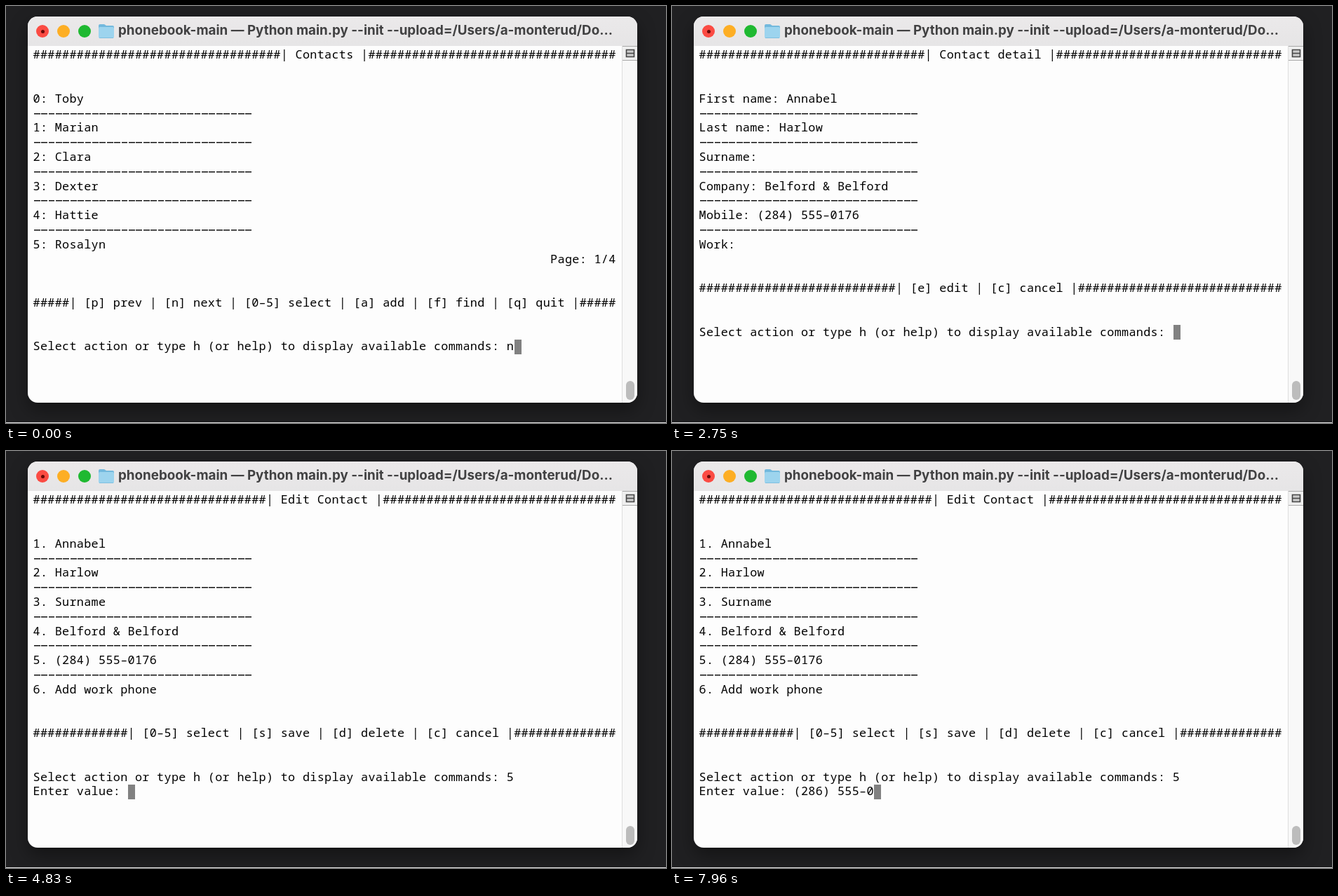
An HTML page for the animation above (8000 ms loop, 941 px wide and 595 px high).

```html
<!DOCTYPE html>
<html lang="en">
<head>
<meta charset="utf-8">
<title>Phonebook terminal</title>
<style>
  html, body { margin: 0; width: 100%; height: 100%; overflow: hidden; background: #202022; }
  #stage { position: relative; width: 941px; height: 595px; overflow: hidden; background: #202022; }
  #stage::after { content: ""; position: absolute; left: 0; right: 0; bottom: 0; height: 1px; background: #e4e4e4; }
  #window {
    position: absolute; left: 31px; top: 15px; width: 869px; height: 551px;
    border-radius: 14px; overflow: hidden; background: #fdfdfd;
  }
  #shade {
    position: absolute; left: 31px; top: 15px; width: 869px; height: 551px;
    border-radius: 14px; box-shadow: 0 10px 26px rgba(0, 0, 0, .4);
  }
  #bar { position: absolute; left: 0; top: 0; width: 100%; height: 42px; background: linear-gradient(#ebe9ea, #e6e5e6); }
  .light { position: absolute; top: 12px; width: 18px; height: 18px; border-radius: 50%; }
  .light.close::after {
    content: ""; position: absolute; left: 6.5px; top: 6.5px; width: 5px; height: 5px;
    border-radius: 50%; background: #6a0a08;
  }
  #folder { position: absolute; left: 100px; top: 9px; }
  #title {
    position: absolute; left: 129px; top: 8px; line-height: 24px; white-space: pre;
    font: 700 18.8px/24px Inter, sans-serif; color: #414142;
  }
  #track { position: absolute; right: 0; top: 42px; width: 21px; bottom: 0; background: #f8f8f8; border-left: 1px solid #dedede; }
  #thumb { position: absolute; left: 5px; bottom: 4px; width: 12px; height: 27px; border-radius: 6px; background: #bcbcbc; }
  #split { position: absolute; left: 0; top: 0; }
  #screen {
    position: absolute; left: 38.5px; top: 59.4px; color: #000; white-space: pre;
    font: 500 16.8px/20.8px "Noto Sans Mono", "DejaVu Sans Mono", monospace; letter-spacing: .32px;
  }
  #screen div { height: 20.8px; }
  #screen .rule {
    width: 312px;
    background: repeating-linear-gradient(90deg, transparent 0 .8px, #111 .8px 9.6px, transparent 9.6px 10.4px) 0 10px / 100% 1.5px no-repeat;
  }
  #cursor { position: absolute; width: 10.4px; height: 20.8px; background: #818181; }
</style>
</head>
<body>
<div id="stage">
  <div id="shade"></div>
  <div id="window">
    <div id="bar">
      <div class="light close" style="left:12px;background:#fb4b43"></div>
      <div class="light" style="left:42px;background:#fdae24"></div>
      <div class="light" style="left:71.5px;background:#1fb931"></div>
      <svg id="folder" width="24" height="24">
        <path d="M1 4q0-2 2-2h6l3 2h9q2 0 2 2v4H1z" fill="#73b9dd"/>
        <rect x="1" y="6" width="22" height="16" rx="2" fill="#9dd4ee"/>
        <path d="M2 21.5h20" stroke="#7ebfe0"/>
      </svg>
      <div id="title">phonebook-main — Python main.py --init --upload=/Users/a-monterud/Do...</div>
    </div>
    <div id="track">
      <svg id="split" width="21" height="22">
        <path d="M0 .5h21M0 20.5h21" stroke="#a9a9a9"/>
        <rect y="1" width="21" height="19" fill="#efefef"/>
        <path d="M5.5 5.5h11v10h-11zM5.5 10.5h11" fill="#c9c9c9" stroke="#444" stroke-width="1.6"/>
      </svg>
      <div id="thumb"></div>
    </div>
  </div>
  <div id="screen"></div>
  <div id="cursor"></div>
</div>
<script>
const LOOP = 8000, COLS = 80, CELL = 10.4, LINE = 20.8, LEFT = 38.5, TOP = 60;
const PROMPT = "Select action or type h (or help) to display available commands: ";
const RULE = "rule";

const pages = [
  "Toby Marian Clara Dexter Hattie Rosalyn",
  "Glenn Audrey Martin Selma Brice Lorena",
  "Felix Dorothy Vernon Ingrid Pauline Hugo",
  "Mina Gordon Odette Annabel Colin"
].map(names => names.split(" "));
const person = ["Annabel", "Harlow", "", "Belford & Belford", "(284) 555-0176", ""];
const labels = ["First name", "Last name", "Surname", "Company", "Mobile", "Work"];

// Centres a heading in a full row of hashes.
function hashes(text) {
  const mid = `| ${text} |`, left = (COLS - mid.length) >> 1;
  return "#".repeat(left) + mid + "#".repeat(COLS - left - mid.length);
}

const ruled = items => items.flatMap((item, i) => i ? [RULE, item] : [item]);

function layout(heading, items, extra, menu) {
  return [hashes(heading), "", "", ...ruled(items), ...extra, "", "", hashes(menu), "", ""];
}

const contacts = n => layout("Contacts", pages[n].map((name, i) => `${i}: ${name}`),
  [`Page: ${n + 1}/4`.padStart(COLS)],
  "[p] prev | [n] next | [0-5] select | [a] add | [f] find | [q] quit");

const detail = layout("Contact detail", person.map((v, i) => `${labels[i]}: ${v}`), [],
  "[e] edit | [c] cancel");

const blanks = ["", "", "Surname", "", "", "Add work phone"];
const edit = layout("Edit Contact", person.map((v, i) => `${i + 1}. ${v || blanks[i]}`), [],
  "[0-5] select | [s] save | [d] delete | [c] cancel");

const [page1, page2, page3, page4] = pages.map((_, i) => contacts(i));

// Start time, screen, answer to the prompt.
const steps = [
  [0, page1, "n"], [330, page2, ""], [620, page2, "n"],
  [750, page3, ""], [1130, page3, "n"], [1420, page4, ""],
  [1920, page4, "3"], [2670, detail, ""], [3420, detail, "e"],
  [3750, edit, ""], [4290, edit, "5"]
].map(([at, rows, typed]) => [at, [...rows, PROMPT + typed]]);

// The new phone number is typed one key at a time.
const number = "(286) 555-0";
[4540, 5710, 5830, 6000, 6290, 6620, 7000, 7170, 7330, 7500, 7750, 7920].forEach((at, i) => {
  // The space follows the bracket at once with the seventh key time.
  steps.push([at, [...edit, PROMPT + "5", "Enter value: " + number.slice(0, i)]]);
});

const screen = document.getElementById("screen");
const cursor = document.getElementById("cursor");
let shown = null;

function show(rows) {
  screen.replaceChildren(...rows.map(text => {
    const row = document.createElement("div");
    if (text === RULE) row.className = RULE;
    else row.textContent = text.replace(/-/g, "–");
    return row;
  }));
  const last = rows.length - 1;
  cursor.style.left = LEFT + rows[last].length * CELL + "px";
  cursor.style.top = TOP + last * LINE + "px";
}

function tick() {
  const t = performance.now() % LOOP;
  const step = steps.findLast(([at]) => at <= t);
  if (step !== shown) show((shown = step)[1]);
  requestAnimationFrame(tick);
}
tick();
</script>
</body>
</html>
```
